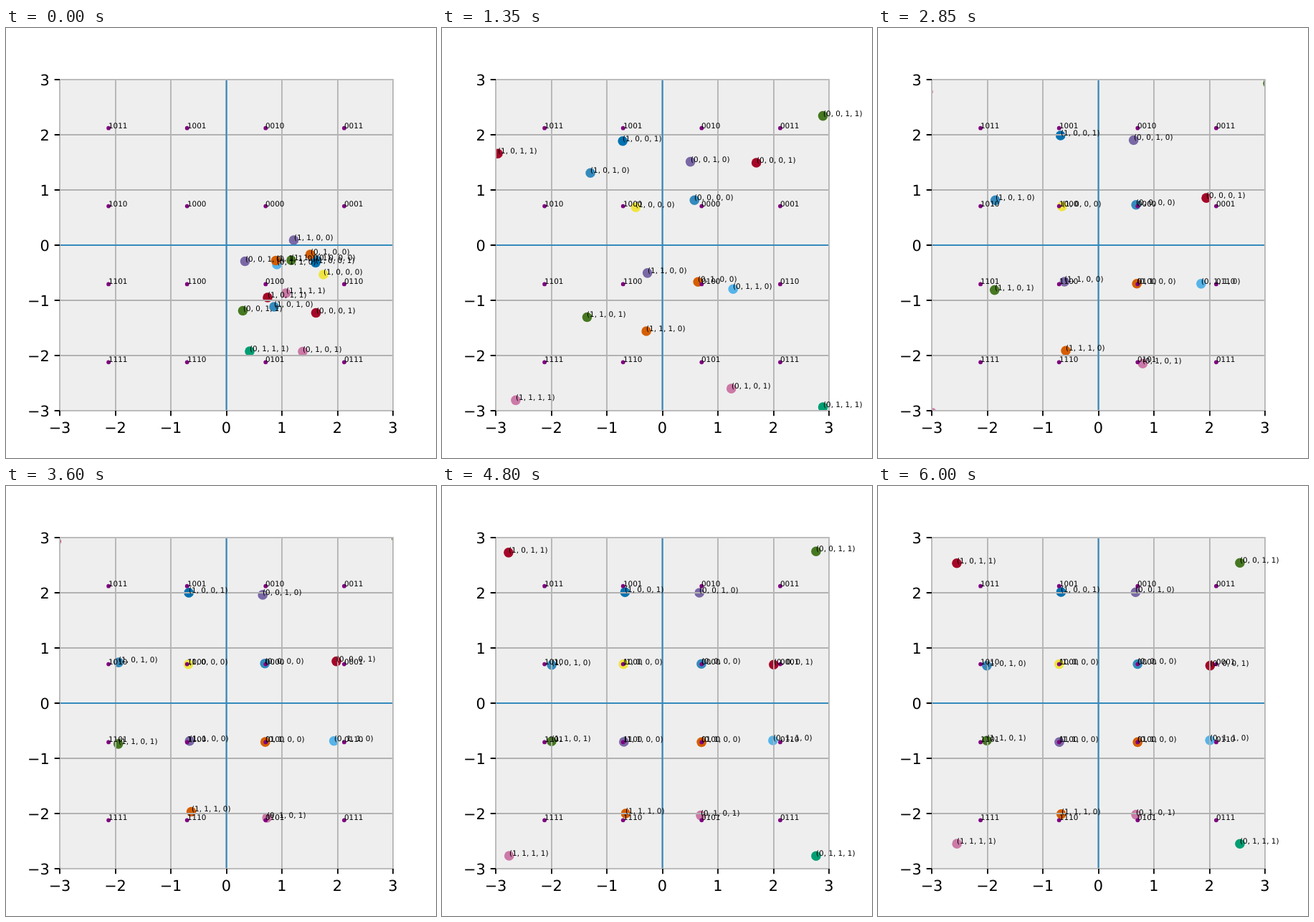
Animation of 600x600 px, one loop 6150 ms. Source, as an HTML page:

```html
<!DOCTYPE html>
<html lang="en">
<head>
<meta charset="utf-8">
<title>Constellation learning</title>
<style>
  html, body { margin: 0; width: 100%; height: 100%; overflow: hidden; background: #fff; }
  svg { display: block; width: 600px; height: 600px; }
  text { font: 10.42px "DejaVu Sans", sans-serif; text-rendering: geometricPrecision; }
  .tick { font-size: 20.83px; }
</style>
</head>
<body>
<svg id="plot" viewBox="0 0 600 600"></svg>
<script>
const LEFT = 75, RIGHT = 540, TOP = 72, BOTTOM = 534;
const STEP = 150, LOOP = 6150, TURN = 750, END = 6000;
const DECAY = 1000;   // ms, pace of settling after the turn
const SWING = 38;     // px, how far the corner symbols drift outwards
const HOME_SCALE = [1, 0.95, 1.2];   // inner, edge and corner symbols
const COLORS = ['#348ABD', '#A60628', '#7A68A6', '#467821', '#D55E00',
                '#CC79A7', '#56B4E9', '#009E73', '#F0E442', '#0072B2'];
const plot = document.getElementById('plot');
const px = x => 307.5 + x * 77.5;
const py = y => 303 - y * 77;
const mix = (a, b, f) => a + (b - a) * f;

function add(parent, tag, attrs, text = '') {
  const el = document.createElementNS('http://www.w3.org/2000/svg', tag);
  set(el, attrs);
  el.textContent = text;
  return parent.appendChild(el);
}
function set(el, attrs) {
  for (const name in attrs) el.setAttribute(name, attrs[name]);
}
const line = (d, stroke, width = 1.8) =>
  add(plot, 'path', { d, stroke, 'stroke-width': width, fill: 'none' });

const clip = add(add(plot, 'defs', {}), 'clipPath', { id: 'axes' });
const box = { x: LEFT, y: TOP, width: RIGHT - LEFT, height: BOTTOM - TOP };
add(clip, 'rect', box);
add(plot, 'rect', { ...box, fill: '#eee' });
const dots = add(plot, 'g', { 'clip-path': 'url(#axes)' });
const anchors = add(plot, 'g', { fill: '#800080' });

// Grid, zero lines, frame, ticks
const marks = [-3, -2, -1, 0, 1, 2, 3];
for (const v of marks) {
  line(`M${Math.round(px(v))} ${TOP}V${BOTTOM}M${LEFT} ${py(v)}H${RIGHT}`, '#b2b2b2');
}
line(`M307.5 ${TOP}V${BOTTOM}M${LEFT} 303H${RIGHT}`, '#348ABD', 2.08);
line(`M${LEFT} ${TOP}H${RIGHT}V${BOTTOM}H${LEFT}Z`, '#bcbcbc');
for (const v of marks) {
  const label = String(v).replace('-', '\u2212');
  line(`M${Math.round(px(v))} ${BOTTOM}v7.3M${LEFT} ${py(v)}h-7.3`, '#000');
  add(plot, 'text', { class: 'tick', x: px(v), y: 565, 'text-anchor': 'middle' }, label);
  add(plot, 'text', { class: 'tick', x: 60.8, y: py(v) + 8, 'text-anchor': 'end' }, label);
}

// Gray mapping: two bits choose the quadrant, two choose inner or outer
function symbol(i) {
  const bits = [...i.toString(2).padStart(4, '0')].map(Number);
  const [left, low, a, b] = bits;
  const [outerX, outerY] = left === low ? [b, a] : [a, b];
  return {
    bits,
    x: (left ? -1 : 1) * (outerX ? 3 : 1) * Math.SQRT1_2,
    y: (low ? -1 : 1) * (outerY ? 3 : 1) * Math.SQRT1_2,
    level: outerX + outerY
  };
}

// Start and turning point of each symbol: x, y, x, y
const points = [
  [433, 324, 344, 233.5], [432.5, 397.5, 418, 136],
  [333.5, 325.5, 336, 218.5], [330.5, 394.5, 545, 144],
  [424.5, 316, 353, 351.5], [414, 451.5, 440, 540],
  [378, 330, 359, 372], [340, 451, 545, 545],
  [443, 344, 285, 251.5], [432, 327.5, 249.5, 166],
  [374, 389, 253, 162], [365, 376, 60, 240],
  [401.5, 296, 314.5, 329], [398, 324, 244.5, 443.5],
  [376.5, 324.5, 309.5, 394], [390.5, 370, 105.5, 527.5]
].map(([startX, startY, turnX, turnY], i) => {
  const { bits, x, y, level } = symbol(i);
  add(anchors, 'circle', { cx: px(x), cy: py(y), r: 2.9 });
  add(plot, 'text', { x: Math.round(px(x)), y: Math.round(py(y)) }, bits.join(''));
  const scale = HOME_SCALE[level];
  const swing = level === 2 ? SWING : 0;
  return {
    start: [startX, startY],
    turn: [turnX, turnY],
    home: [px(x * scale), py(y * scale)],
    swing: [Math.sign(x) * swing, -Math.sign(y) * swing],
    dot: add(dots, 'circle', { r: 6.8, fill: COLORS[i % COLORS.length] }),
    label: add(plot, 'text', {}, `(${bits.join(', ')})`)
  };
});

// Straight run to the turning point, then exponential settling at home
function position({ start, turn, home, swing }, t) {
  if (t < TURN) return start.map((from, i) => mix(from, turn[i], t / TURN));
  const settled = 1 - Math.exp((TURN - t) / DECAY);
  const drift = Math.sin(Math.PI * (t - TURN) / (END - TURN)) ** 2;
  return turn.map((from, i) => mix(from, home[i], settled) + swing[i] * drift);
}

function draw(now) {
  const t = Math.floor((now % LOOP) / STEP) * STEP;
  for (const point of points) {
    const [x, y] = position(point, t);
    const inside = x >= LEFT && x <= RIGHT && y >= TOP && y <= BOTTOM;
    set(point.dot, { cx: x, cy: y });
    set(point.label, {
      x: Math.round(x), y: Math.round(y), visibility: inside ? 'visible' : 'hidden'
    });
  }
}

const start = performance.now();
function tick() {
  draw(performance.now() - start);
  requestAnimationFrame(tick);
}
tick();
</script>
</body>
</html>
```
